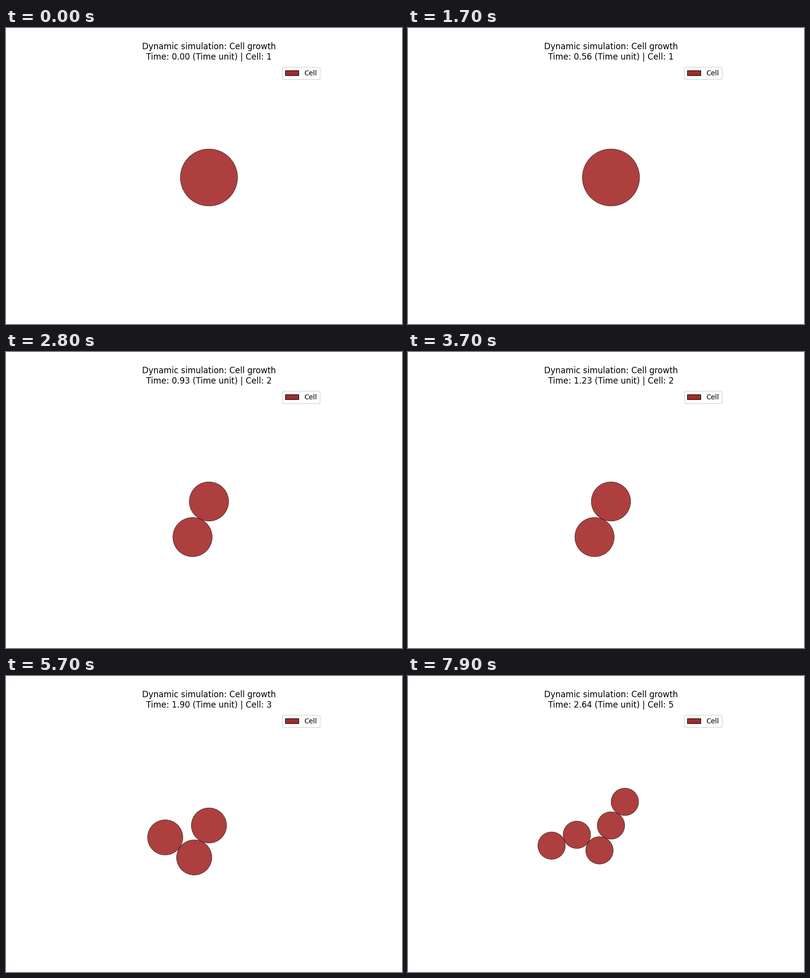
A matplotlib script for the animation above (8000 ms loop, 800 by 600 pixels).

```python
import numpy as np
import matplotlib.pyplot as plt
from matplotlib.animation import FuncAnimation
from matplotlib.patches import Circle, Patch

FRAMES, INTERVAL = 80, 100
DT = 10 / 299          # simulated time per frame
RADIUS, MARGIN = 0.5, 2
CAPACITY, RATE = 10, 0.8

# Each new cell touches its parent: (parent index, angle in degrees)
BIRTHS = [(0, 245.3), (1, 145.3), (0, 59.6), (2, 203.3)]


def grow():
    cells = [np.zeros(2)]
    for parent, angle in BIRTHS:
        a = np.radians(angle)
        cells.append(cells[parent] + 2 * RADIUS * np.array([np.cos(a), np.sin(a)]))
    return np.array(cells)


def population(t):
    """Logistic growth from a single cell."""
    size = CAPACITY / (1 + (CAPACITY - 1) * np.exp(-RATE * t))
    return min(int(size + 0.5), len(CELLS))


CELLS = grow()

plt.rcParams["font.family"] = "DejaVu Sans"
fig, ax = plt.subplots(figsize=(8, 6), dpi=100)
ax.set_aspect("equal")
ax.axis("off")

discs = [
    ax.add_patch(Circle(c, RADIUS, facecolor="brown", edgecolor="black",
                        linewidth=0.5, alpha=0.9))
    for c in CELLS
]
ax.legend(handles=[Patch(facecolor="brown", edgecolor="black",
                         linewidth=0.8, label="Cell")], loc="upper right")
title = ax.set_title("")


def update(i):
    t = int(i * DT * 100) / 100
    n = population(t)
    for k, disc in enumerate(discs):
        disc.set_visible(k < n)
    lim = np.abs(CELLS[:n]).max() + MARGIN
    ax.set_xlim(-lim, lim)
    ax.set_ylim(-lim, lim)
    title.set_text("Dynamic simulation: Cell growth\n"
                   f"Time: {t:.2f} (Time unit) | Cell: {n}")
    return [*discs, title]


anim = FuncAnimation(fig, update, frames=FRAMES, interval=INTERVAL,
                     repeat=True, repeat_delay=0, blit=False)
plt.show()
```
